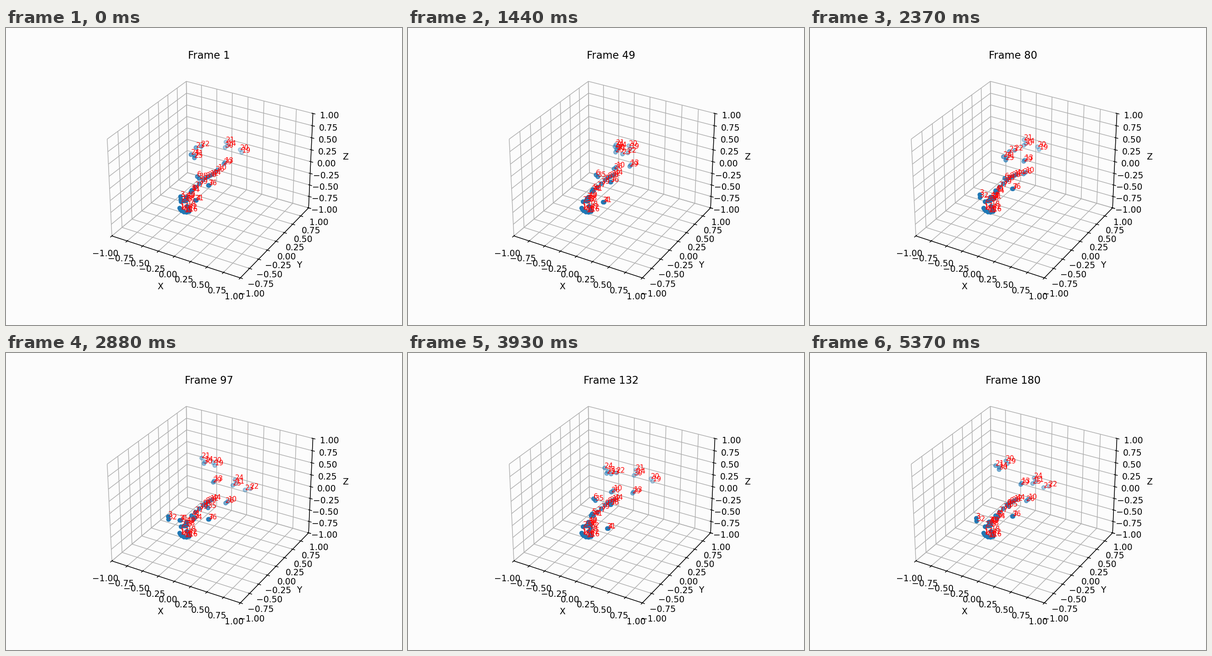
Write a matplotlib script that moves like this. It is 864x648 px and loops after 5400 ms.

```python
import numpy as np
import matplotlib.pyplot as plt
from matplotlib.animation import FuncAnimation
from matplotlib.colors import to_rgb

W, H, DPI = 864, 648, 135
FRAMES, STEP = 180, 30
STRIDE = 73.5   # gait cycle, in frames
SWING = 29.5    # part of it with the foot off the ground
BG = "#fcfcfc"


def gait(t):
    """Common rhythm of knees, arms and shoulders."""
    return np.cos(2 * np.pi * (t - 21) / STRIDE)


def chain(ids, *points):
    """Markers spread evenly along a polyline of the trunk."""
    u = np.linspace(0, len(points) - 1, len(ids))
    xs, ys = zip(*points)
    knots = range(len(points))
    return dict(zip(ids, zip(np.interp(u, knots, xs), np.interp(u, knots, ys))))


def limb(t, ids, center, sweep, gap):
    """A pair of markers swinging together along one direction."""
    a = np.array(center) + gait(t) * np.array(sweep)
    return {ids[0]: a, ids[1]: a + np.array(gap)}


def foot(t, ids, edge, shift=(0, 0)):
    """Eased swing forward, steady glide back, heel raised at push-off."""
    u = (t - 70) % STRIDE
    if u < SWING:
        s = 0.5 - 0.5 * np.cos(np.pi * u / SWING)
    else:
        s = (STRIDE - u) / (STRIDE - SWING)
    v = (u - 5.5 + STRIDE / 2) % STRIDE - STRIDE / 2
    lift = max(0, np.cos(np.pi * v / 26))
    toe = np.array([422 + 115 * s, 247 + 51 * s + 10 * lift]) + shift
    heel = np.array([400 + 103 * s, 240 + 38 * s + 36 * lift]) + shift
    mid = heel + (8 - 6 * s, 8 - 6 * lift)
    sole = heel + (8 - 13 * s, 12 - 5 * lift)
    return dict(zip(ids, (toe, toe + np.array(edge), heel, mid, sole)))


TRUNK = {
    **chain((18, 42, 16, 0, 15, 43, 1, 17),
            (395, 389), (401, 400), (391, 403), (382, 398), (379, 393)),
    **chain((40, 37, 38, 33, 2), (394, 369), (394, 376), (382, 379)),
    **chain((44, 12, 28, 8, 9, 39, 27, 41), (450, 320), (434, 328), (405, 355)),
}


def body(t):
    marks = {
        **TRUNK,
        **foot(t, (22, 23, 24, 11, 25), (-11.5, 2.5)),
        **foot(t + STRIDE / 2, (20, 19, 21, 14, 30), (3.5, 6), (2, -20)),
        # knees
        **limb(t, (10, 26), (466, 312), (18, 12), (-4.5, 3.5)),
        **limb(t, (13, 29), (473, 291), (-19, -12), (-2, 3)),
        # hands
        **limb(t, (3, 32), (376, 366), (-22, -9), (0.5, 6)),
        **limb(t, (4, 31), (409, 374), (-28, -9), (-2, 0)),
        # elbows
        **limb(t, (6, 35), (421, 326), (16, 8), (4, 4)),
        **limb(t, (7, 36), (443, 347), (0, 16), (-1.5, 0)),
        # shoulder
        **limb(t, (5, 34), (407, 355), (5, 4), (-2.5, 4)),
    }
    return np.array([marks[i] for i in sorted(marks)])


def depth_alpha(pts):
    """The head end is near the viewer, the feet fade away."""
    x, y = pts.T
    return np.clip(0.7 - 0.003 * (x - 440) + 0.0035 * (y - 322), 0.3, 1)


fig = plt.figure(figsize=(W / DPI, H / DPI), dpi=DPI, facecolor=BG)
ax = fig.add_subplot(projection="3d", facecolor=BG)
ticks = np.linspace(-1, 1, 9)
ax.set(xlim=(-1, 1), ylim=(-1, 1), zlim=(-1, 1),
       xticks=ticks, yticks=ticks, zticks=ticks,
       xlabel="X", ylabel="Y", zlabel="Z")
for axis in (ax.xaxis, ax.yaxis, ax.zaxis):
    axis.set_pane_color(BG)
title = ax.set_title("Frame 1")

# markers live in a pixel-space layer above the box
layer = fig.add_axes([0, 0, 1, 1])
layer.set(xlim=(0, W), ylim=(H, 0))
layer.axis("off")
start = body(0)
dots = layer.scatter(*start.T, s=20)
labels = [layer.text(x, y, str(i), color="red", size=8, zorder=5)
          for i, (x, y) in enumerate(start)]
BLUE = to_rgb("C0")


def update(n):
    pts = body(n)
    shade = depth_alpha(pts)
    order = np.argsort(shade, kind="stable")
    colors = [(*BLUE, a) for a in shade[order]]
    dots.set_offsets(pts[order])
    dots.set_facecolor(colors)
    dots.set_edgecolor(colors)
    for label, p in zip(labels, pts):
        label.set_position(p)
    title.set_text(f"Frame {n + 1}")
    return [dots, title, *labels]


anim = FuncAnimation(fig, update, frames=FRAMES, interval=STEP,
                     repeat=True, repeat_delay=0, blit=False)
plt.show()
```
